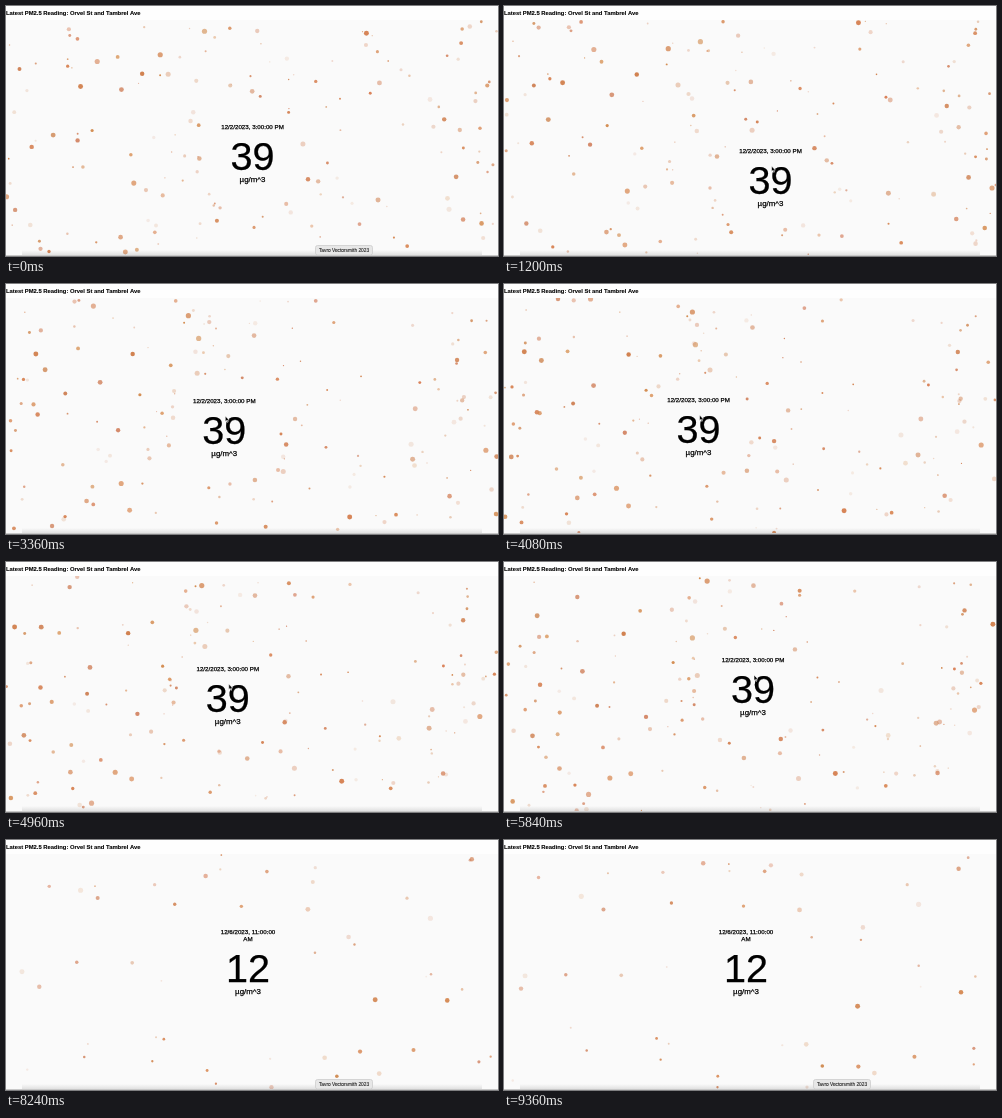
An HTML page with a canvas that plays this animation: 492x250 px, repeating every 9.44 s.

```html
<!DOCTYPE html>
<html lang="en">
<head>
<meta charset="utf-8">
<title>Air quality reading</title>
<style>
  html, body { margin: 0; width: 100%; height: 100%; overflow: hidden; background: #fff; }
  canvas { display: block; }
</style>
</head>
<body>
<canvas id="stage" width="492" height="250"></canvas>
<script>
const ctx = document.getElementById('stage').getContext('2d');
const WIDTH = 492, TOP = 14, HEIGHT = 235;
const LOOP = 9440, STEP = 80;
const SWITCH = 6480;          // the second reading appears
const CLEAR_RADIUS = 50;      // dots are pushed out of this circle
const FONT = '"Liberation Sans", Arial, sans-serif';

const readings = [
  { value: 39, date: ['12/2/2023, 3:00:00 PM'], seed: 8 },
  { value: 12, date: ['12/6/2023, 11:00:00', 'AM'], seed: 23 }
];

// time, x, y of the reading's centre
const path = [
  [0, 246.5, 150], [320, 246.5, 150], [1200, 266.5, 174], [2640, 242, 147],
  [4080, 194.5, 145], [5840, 249, 127], [6480, 242, 128], [LOOP, 242, 128]
];

function randomFrom(seed) {
  return () => {
    seed = (seed + 0x6D2B79F5) | 0;
    let n = Math.imul(seed ^ (seed >>> 15), 1 | seed);
    n = (n + Math.imul(n ^ (n >>> 7), 61 | n)) ^ n;
    return ((n ^ (n >>> 14)) >>> 0) / 4294967296;
  };
}

function makeDots({ value, seed }) {
  const random = randomFrom(seed);
  return Array.from({ length: value * 4 }, () => ({
    x: random() * WIDTH,
    y: random() * HEIGHT,
    vx: (random() - 0.5) * 30,
    vy: (random() - 0.5) * 30,
    radius: 0.6 + random() * 2,
    color: `rgba(${206 + random() * 10}, ${124 + random() * 14}, ${72 + random() * 22}, ${0.12 + random() * 0.88})`
  }));
}
readings.forEach(reading => reading.dots = makeDots(reading));

const wrap = (n, size) => ((n % size) + size) % size;

function centreAt(time) {
  const i = path.findIndex(key => key[0] > time);
  const [t0, x0, y0] = path[i - 1], [t1, x1, y1] = path[i];
  const p = (time - t0) / (t1 - t0);
  const eased = p * p * (3 - 2 * p);
  return { x: x0 + (x1 - x0) * eased, y: y0 + (y1 - y0) * eased };
}

// A thin outline gives the text its slightly heavy strokes.
function write(text, x, y, size, { align = 'center', weight = '', color = '#000', outline = 0.25 } = {}) {
  ctx.font = `${weight} ${size}px ${FONT}`;
  ctx.textAlign = align;
  ctx.fillStyle = ctx.strokeStyle = color;
  ctx.lineWidth = outline;
  ctx.fillText(text, x, y);
  ctx.strokeText(text, x, y);
}

function drawDot(dot, seconds, centre) {
  let x = wrap(dot.x + dot.vx * seconds, WIDTH);
  let y = TOP + wrap(dot.y + dot.vy * seconds, HEIGHT);
  const dx = x - centre.x, dy = y - centre.y;
  const distance = Math.hypot(dx, dy) || 1;
  const edge = CLEAR_RADIUS + 16;
  if (distance < edge) {
    const pushed = CLEAR_RADIUS + 16 * distance / edge;
    x = centre.x + dx / distance * pushed;
    y = centre.y + dy / distance * pushed;
  }
  ctx.fillStyle = dot.color;
  ctx.beginPath();
  ctx.arc(x, y, dot.radius, 0, Math.PI * 2);
  ctx.fill();
}

function drawReading({ value, date }, { x, y }) {
  date.forEach((line, i) => write(line, x, y - 27.3 - (date.length - 1 - i) * 7.2, 6.2));
  write(value, x, y + 13.8, 39.6);
  write('µg/m^3', x, y + 26.2, 7.9);
}

function drawPointer(x, y) {
  ctx.beginPath();
  [[0, 0], [0, 5.6], [1.3, 4.5], [2.2, 6.4], [3, 6], [2.2, 4.2], [3.9, 4]]
    .forEach(([dx, dy]) => ctx.lineTo(x + dx, y + dy));
  ctx.closePath();
  ctx.fillStyle = '#000';
  ctx.strokeStyle = '#fff';
  ctx.lineWidth = 0.6;
  ctx.fill();
  ctx.stroke();
}

function drawBottomEdge() {
  const shadow = ctx.createLinearGradient(0, 244, 0, 250);
  shadow.addColorStop(0, 'rgba(0, 0, 0, 0)');
  shadow.addColorStop(1, 'rgba(0, 0, 0, 0.12)');
  ctx.fillStyle = shadow;
  ctx.fillRect(16, 244, WIDTH - 32, 6);
  ctx.fillStyle = '#c8c8c8';
  ctx.fillRect(0, 249, WIDTH, 1);
}

function drawTooltip() {
  ctx.beginPath();
  ctx.roundRect(309.5, 239.5, 57, 9.5, 2);
  ctx.fillStyle = '#e7e7e7';
  ctx.strokeStyle = '#c9c9c9';
  ctx.lineWidth = 0.7;
  ctx.fill();
  ctx.stroke();
  write('Tavro Vectorsmith 2023', 338, 246, 4.8, { color: '#222', outline: 0.1 });
}

function draw(time) {
  const reading = readings[time < SWITCH ? 0 : 1];
  const centre = centreAt(time);

  ctx.fillStyle = '#fefefe';
  ctx.fillRect(0, 0, WIDTH, 250);
  ctx.fillStyle = '#fafafa';
  ctx.fillRect(0, TOP, WIDTH, HEIGHT);

  ctx.save();
  ctx.beginPath();
  ctx.rect(0, TOP, WIDTH, HEIGHT);
  ctx.clip();
  reading.dots.forEach(dot => drawDot(dot, time / 1000, centre));
  ctx.restore();

  drawReading(reading, centre);
  write('Latest PM2.5 Reading: Orvel St and Tambrel Ave', 0, 9, 5.85, { align: 'left', weight: 'bold', outline: 0.1 });

  drawBottomEdge();
  if (time < 320 || time >= SWITCH) drawTooltip();
  if (time >= 640 && time < 6240) drawPointer(centre.x + 1, centre.y - 14);
}

const start = performance.now();
function tick() {
  const elapsed = (performance.now() - start) % LOOP;
  draw(Math.floor(elapsed / STEP) * STEP);
  requestAnimationFrame(tick);
}
tick();
</script>
</body>
</html>
```
